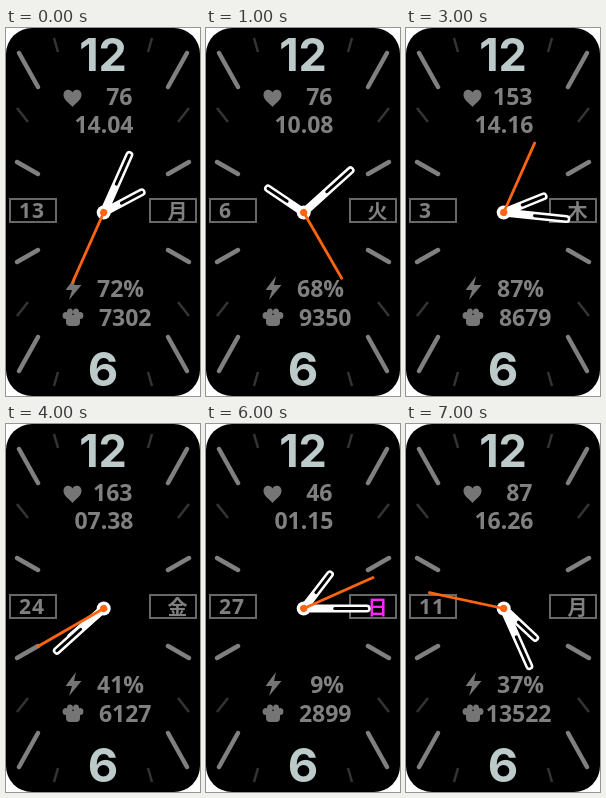
These frames come from a looping animation (194x368 px, 8000 ms). An HTML page:

```html
<!DOCTYPE html>
<html lang="ja">
<head>
<meta charset="utf-8">
<title>Watch face</title>
<style>
html, body { margin: 0; width: 100%; height: 100%; overflow: hidden; background: #fff; }
svg { display: block; width: 100vw; height: 100vh; }
text { font-family: "Open Sans", "Noto Sans", sans-serif; font-weight: 700; font-size: 23px; fill: #808080; }
.value { text-anchor: end; }
.numeral { font: 700 45px Inter, sans-serif; text-anchor: middle; fill: #bccaca; }
#date { font-size: 21px; letter-spacing: 1px; }
#day { font: 700 20px "Noto Sans CJK JP", "Noto Sans CJK", sans-serif; text-anchor: middle; }
.icon { fill: #767676; }
.box { fill: none; stroke: #686868; stroke-width: 2; }
.major { stroke: #808080; stroke-width: 4.5; stroke-linecap: round; }
.minor { stroke: #343434; stroke-width: 2.5; }
.hand { stroke-linecap: round; }
</style>
</head>
<body>
<svg viewBox="0 0 194 368">
  <rect width="194" height="368" rx="26"/>
  <g id="ticks"></g>
  <text class="numeral" x="97" y="43">12</text>
  <text class="numeral" x="97" y="357.5" style="font-size:47px">6</text>

  <path class="icon" d="M66.500 79C63.500 75 57.500 72 57.500 67C57.500 61 64.500 60 66.500 64.500C68.500 60 75.500 61 75.500 67C75.500 72 69.500 75 66.500 79Z"/>
  <path class="icon" d="M70 248L59.500 262H66L63 272L75.500 257H68Z"/>
  <g class="icon">
    <ellipse cx="59.8" cy="287.5" rx="3.2" ry="3.6"/>
    <ellipse cx="64" cy="284" rx="3" ry="3.6"/>
    <ellipse cx="70" cy="284" rx="3" ry="3.6"/>
    <ellipse cx="74.2" cy="287.5" rx="3.2" ry="3.6"/>
    <rect x="60" y="287" width="14" height="11" rx="4"/>
  </g>

  <rect class="box" x="4" y="171" width="46" height="23"/>
  <rect class="box" x="144" y="171" width="46" height="23"/>
  <text id="pulse" class="value" x="126.5" y="77"></text>
  <text id="time" class="value" x="127.5" y="104.5"></text>
  <text id="battery" class="value" x="138" y="268.5"></text>
  <text id="steps" class="value" x="145.5" y="297.5"></text>
  <text id="date" x="13" y="190"></text>
  <text id="day" x="171.5" y="190.5"></text>

  <g transform="translate(97.7 184.5)">
    <g id="hour" class="hand"></g>
    <g id="minute" class="hand"></g>
    <circle r="7" fill="#fff"/>
    <g id="second" class="hand">
      <path d="M0 0V-76" stroke="#ff6410" stroke-width="2.8"/>
      <circle r="3.6" fill="#ff6410"/>
    </g>
  </g>
</svg>
<script>
const STEP = 1000;
const GREY = '#808080';
const DAY_COLOR = { '土': '#18a0ff', '日': '#f828ff' };

// hour, minute, second, pulse, battery, steps, date, weekday
const states = [
  [14, 4, 34, 76, 72, 7302, 13, '月'],
  [10, 8, 25, 76, 68, 9350, 6, '火'],
  [1, 49, 13, 146, 57, 14744, 19, '水'],
  [14, 16, 4, 153, 87, 8679, 3, '木'],
  [7, 38, 40, 163, 41, 6127, 24, '金'],
  [19, 7, 0, 179, 57, 3353, 21, '土'],
  [1, 15, 11, 46, 9, 2899, 27, '日'],
  [16, 26, 47, 87, 37, 13522, 11, '月']
];

const $ = id => document.getElementById(id);
const pad = n => String(n).padStart(2, '0');
const setText = (id, value) => { $(id).textContent = value; };
const rotate = (id, deg) => $(id).setAttribute('transform', `rotate(${deg})`);

// Each tick is mirrored into all four quadrants.
function buildTicks() {
  const ticks = [
    ['major', 13, 25, 32, 59],
    ['major', 11, 134, 32, 146],
    ['minor', 48, 10, 52, 24],
    ['minor', 11, 80, 22, 94]
  ];
  let markup = '';
  for (const [kind, x1, y1, x2, y2] of ticks) {
    for (const flipX of [false, true]) {
      for (const flipY of [false, true]) {
        const x = v => flipX ? 194 - v : v;
        const y = v => flipY ? 368 - v : v;
        markup += `<path class="${kind}" d="M${x(x1)} ${y(y1)}L${x(x2)} ${y(y2)}"/>`;
      }
    }
  }
  $('ticks').innerHTML = markup;
}

function buildHand(id, slot, length) {
  $(id).innerHTML =
    `<path d="M0 0V${-length}" stroke="#fff" stroke-width="8"/>` +
    `<path d="M0 ${-slot}V${-length}" stroke="#000" stroke-width="3"/>`;
}

function show([h, m, s, pulse, battery, steps, date, day]) {
  setText('pulse', pulse);
  setText('time', `${pad(h)}.${pad(m)}`);
  setText('battery', `${battery}%`);
  setText('steps', steps);
  setText('date', date);
  setText('day', day);
  $('day').style.fill = DAY_COLOR[day] || GREY;
  rotate('hour', h % 12 * 30 + m / 2);
  rotate('minute', m * 6);
  rotate('second', s * 6);
}

let shown = -1;
function tick() {
  const i = Math.floor(performance.now() / STEP) % states.length;
  if (i !== shown) show(states[shown = i]);
  requestAnimationFrame(tick);
}

buildTicks();
buildHand('hour', 20, 43);
buildHand('minute', 31, 63);
tick();
</script>
</body>
</html>
```
